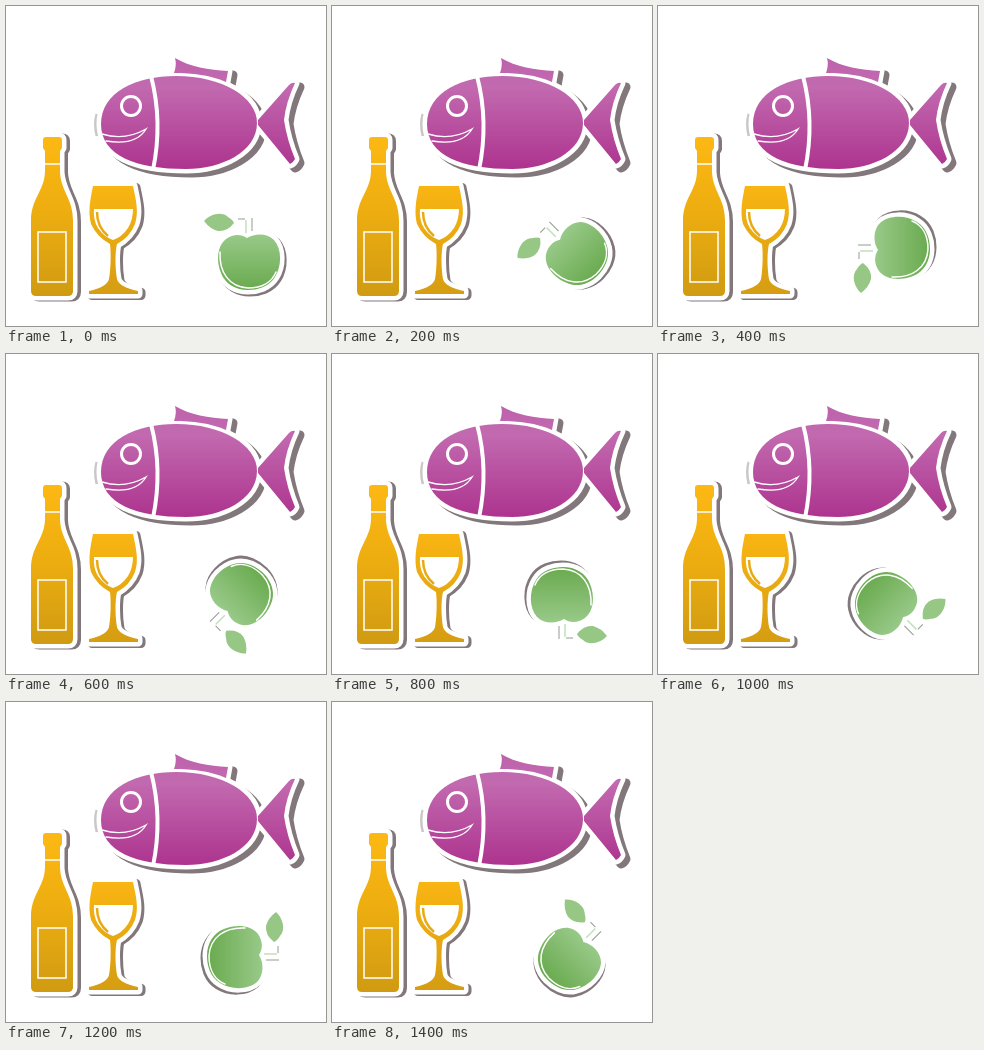
An HTML page for the animation above (1.6 s loop, 320 px wide and 320 px high).

```html
<!DOCTYPE html>
<html lang="en">
<head>
<meta charset="utf-8">
<title>Food stickers</title>
<style>
  html, body { margin: 0; width: 100%; height: 100%; overflow: hidden; background: #fff; }
  svg { display: block; width: 100%; height: 100%; }
  .shadow { fill: #82777a; stroke: #82777a; stroke-width: 9; stroke-linejoin: round; }
  .rim { fill: #fff; stroke: #fff; stroke-width: 9; stroke-linejoin: round; }
  .line { fill: none; stroke: #fff; stroke-linecap: round; }
</style>
</head>
<body>
<svg viewBox="0 0 320 320">
  <defs>
    <linearGradient id="plum" gradientUnits="userSpaceOnUse" x1="0" y1="52" x2="0" y2="164">
      <stop offset="0" stop-color="#bd62ac"/>
      <stop offset=".25" stop-color="#c26ab0"/>
      <stop offset="1" stop-color="#ad338e"/>
    </linearGradient>
    <linearGradient id="gold" gradientUnits="userSpaceOnUse" x1="0" y1="131" x2="0" y2="290">
      <stop offset="0" stop-color="#fdb813"/>
      <stop offset=".45" stop-color="#eeae10"/>
      <stop offset="1" stop-color="#d09b12"/>
    </linearGradient>
    <linearGradient id="wine" gradientUnits="userSpaceOnUse" x1="0" y1="180" x2="0" y2="288">
      <stop offset="0" stop-color="#f9b512"/>
      <stop offset="1" stop-color="#d69d12"/>
    </linearGradient>
    <linearGradient id="green" gradientUnits="userSpaceOnUse" x1="0" y1="229" x2="0" y2="284">
      <stop offset="0" stop-color="#98c988"/>
      <stop offset="1" stop-color="#69aa4e"/>
    </linearGradient>

    <g id="fish">
      <path d="M95 118C95 86 130 70 170 70C216 70 251 91 251 117C251 146 215 163 180 163C130 163 95 150 95 118Z"/>
      <path d="M169 52C184 61 203 64 222 65L220 76C204 69 187 67 168 67Q171 59 169 52Z"/>
      <path d="M252 114L283 79Q286 76 289 77Q280 96 278 114Q281 134 289 153Q287 157 284 158L252 119Z"/>
    </g>
    <path id="bottle" d="M37 134Q37 131 40 131H53Q56 131 56 134V142L54 145V166C55 186 67 192 67 215V285Q67 290 62 290H30Q25 290 25 285V215C25 192 38 186 39 166V145L37 142Z"/>
    <path id="glass" d="M87 180H127C130 194 133 206 129 218Q124 231 111 238C109 246 109 262 111 273Q113 281 132 285V288H83V285Q101 281 103 273C105 262 105 246 104 238Q91 231 85 218C82 206 84 194 87 180Z"/>
    <path id="apple" d="M241 232C249 227 261 227 268 234C276 243 276 260 269 271C263 281 251 284 242 284C230 284 219 278 215 267C210 255 211 240 220 233C227 228 235 228 241 232Z"/>
  </defs>

  <path d="M91 108Q88 118 91 130" fill="none" stroke="#cbc7c7" stroke-width="3"/>
  <use href="#fish" class="shadow" x="5" y="4"/>
  <use href="#fish" class="rim"/>
  <use href="#fish" fill="url(#plum)"/>
  <g class="line">
    <path d="M145 70Q157 116 147 164" stroke-width="4" stroke-linecap="butt"/>
    <circle cx="125" cy="100" r="9.500" stroke-width="3"/>
    <path d="M96 128Q119 135 140 123Q130 140 100 135" stroke-width="1.400"/>
  </g>

  <use href="#bottle" class="shadow" x="3.500" y="1"/>
  <use href="#bottle" class="rim"/>
  <use href="#bottle" fill="url(#gold)"/>
  <path class="line" d="M37 158H56" stroke-width="1.500"/>
  <rect class="line" x="32" y="226" width="28" height="50" stroke-width="1.500"/>

  <use href="#glass" class="shadow" x="3" y="1.500"/>
  <use href="#glass" class="rim"/>
  <use href="#glass" fill="url(#wine)"/>
  <path fill="#fff" d="M88 203H127Q127 214 122 222Q116 231 107 234Q98 231 92 222Q87 214 88 203Z"/>
  <path d="M91 206Q91 221 102 230" fill="none" stroke="#e9aa11" stroke-width="2.500"/>

  <g id="spinner">
    <use href="#apple" class="shadow" x="2" y="2"/>
    <use href="#apple" class="rim"/>
    <path d="M246 212V225M232 213H239" fill="none" stroke="#969c90"/>
    <path d="M240 214V227" fill="none" stroke="#c5dfbd" stroke-width="1.500"/>
    <path fill="#97c785" d="M198 215C204 208 216 205 222 211Q227 214 228 217Q221 226 212 225Q204 223 198 215Z"/>
    <use href="#apple" fill="url(#green)"/>
    <path class="line" d="M214 246C213 266 223 281 242 282C256 282 266 276 270 266" stroke-width="1.500"/>
  </g>
</svg>
<script>
  const spinner = document.getElementById("spinner");
  const STEP = 200, STEPS = 8;

  function draw() {
    const step = Math.floor(performance.now() / STEP) % STEPS;
    spinner.setAttribute("transform", `rotate(${-step * 360 / STEPS} 236.5 248.5)`);
    requestAnimationFrame(draw);
  }
  draw();
</script>
</body>
</html>
```
